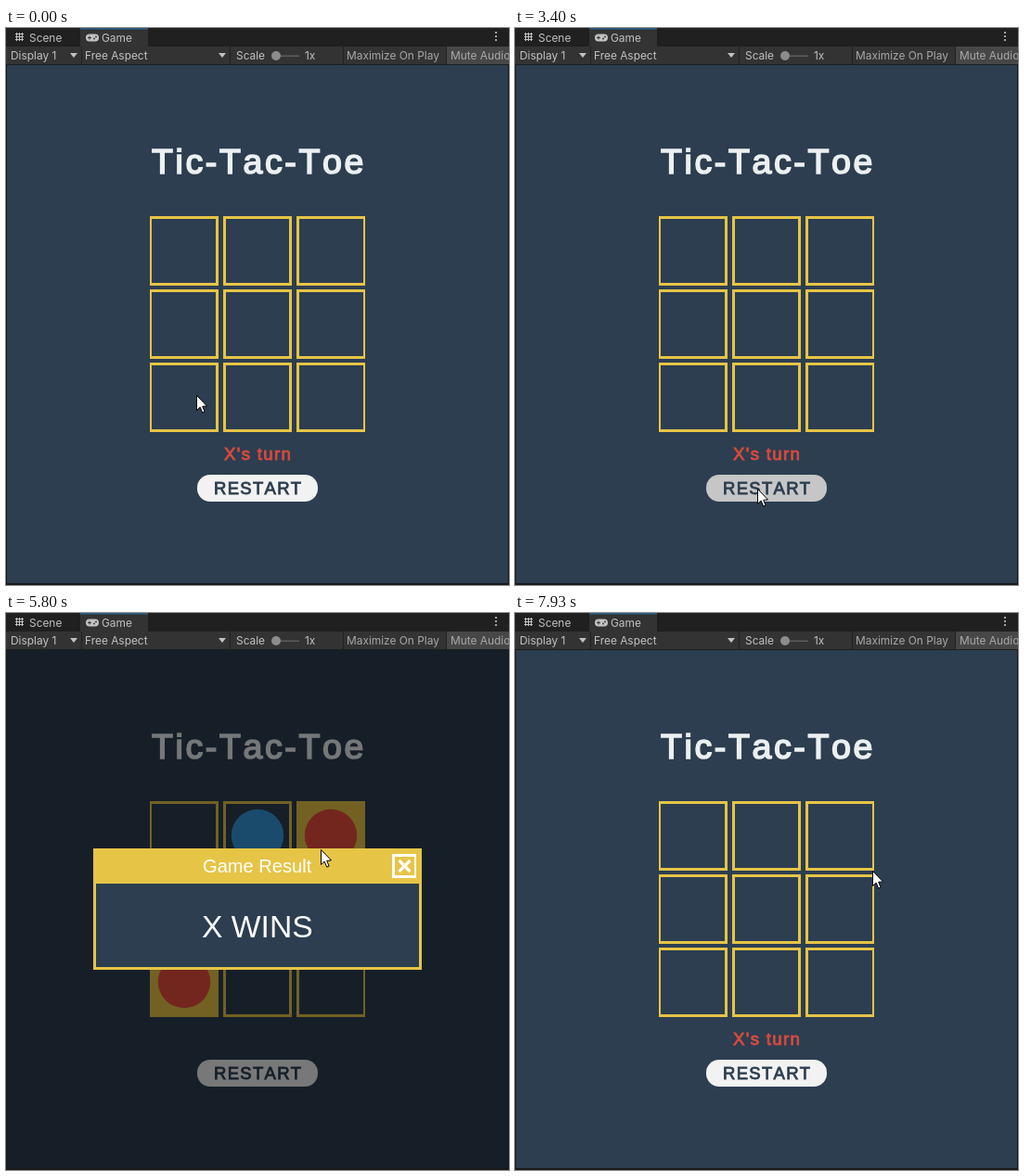
An HTML page with a canvas for the animation above (8000 ms loop, 542 px wide and 601 px high).

```html
<!DOCTYPE html>
<html lang="en">
<head>
<meta charset="utf-8">
<title>Tic-Tac-Toe</title>
<style>
html, body { margin: 0; width: 100%; height: 100%; overflow: hidden; background: #191919; }
canvas { display: block; }
</style>
</head>
<body>
<canvas id="stage" width="542" height="601"></canvas>
<script>
const ctx = document.getElementById('stage').getContext('2d');
const STEPS = 120, STEP = 200 / 3, FADE = 100;
const NAVY = '#2c3e50', YELLOW = '#e6c446', RED = '#e74c3c', BLUE = '#3498db';
const SANS = '"Liberation Sans", Arial, sans-serif';
const UI = 'Inter, Roboto, sans-serif';
const LINES = ['012', '345', '678', '036', '147', '258', '048', '246'];

// Pointer stops: what is clicked (a cell number, a named button or nothing),
// the tip's position, and the step of the release.
const stop = (button, x, y, step) => ({ button, x, y, up: Math.round(step * STEP) });
const STOPS = [
  stop('', 205, 396, 0),
  stop(6, 209, 396, 7),
  stop(3, 200, 325, 12),
  stop(0, 200, 236, 20),
  stop(1, 262, 250, 29),
  stop('restart', 263, 490, 45),
  stop('restart', 261, 497, 53),
  stop(6, 200, 400, 60),
  stop(3, 200, 325, 66),
  stop(4, 264, 324, 75),
  stop(1, 273, 252, 79),
  stop(2, 339, 255, 87),
  stop('', 339, 255, 91),
  stop('', 325, 287, 96),
  stop('close', 426, 270, 116),
  stop('', 385, 278, 119)
];
const CLICKS = STOPS.filter(s => s.button !== '');

const clamp = v => Math.max(0, Math.min(1, v));
const isCell = button => typeof button === 'number';

function rect(x, y, w, h, color) {
  ctx.fillStyle = color;
  ctx.fillRect(x, y, w, h);
}

function disc(x, y, r, color) {
  ctx.fillStyle = color;
  ctx.beginPath();
  ctx.arc(x, y, r, 0, Math.PI * 2);
  ctx.fill();
}

function pill(x, y, w, h, r, color) {
  ctx.fillStyle = color;
  ctx.beginPath();
  ctx.roundRect(x, y, w, h, r);
  ctx.fill();
}

function poly(points, color) {
  ctx.fillStyle = color;
  ctx.beginPath();
  points.forEach(p => ctx.lineTo(p[0], p[1]));
  ctx.closePath();
  ctx.fill();
}

function text(str, x, y, size, color, family = SANS) {
  ctx.font = `${size}px ${family}`;
  ctx.fillStyle = color;
  ctx.fillText(str, x, y);
}

// regular face, thickened and widely spaced
function heavy(str, x, y, size, color) {
  ctx.letterSpacing = size * 0.07 + 'px';
  ctx.fontKerning = 'none';
  text(str, x, y, size, color);
  ctx.strokeStyle = color;
  ctx.lineWidth = size * 0.045;
  ctx.lineJoin = 'miter';
  ctx.strokeText(str, x, y);
  ctx.letterSpacing = '0px';
  ctx.fontKerning = 'auto';
}

function gameAt(t) {
  let game = { board: {}, count: 0, win: '' };
  for (const { button, up } of CLICKS) {
    if (up > t) break;
    if (isCell(button)) {
      const mark = 'XO'[game.count++ % 2];
      game.board[button] = mark;
      game.win = LINES.find(l => [...l].every(c => game.board[c] === mark)) || '';
    } else {
      game = { board: {}, count: 0, win: '' };
    }
  }
  return game;
}

// how far a button is tinted, 0 to 1
function pressed(button, t) {
  const hold = isCell(button) ? 160 : 260;
  return Math.max(0, ...CLICKS.filter(c => c.button === button).map(({ up }) =>
    t < up ? clamp((t - up + hold) / FADE) : clamp(1 - (t - up) / FADE)));
}

// rest one step after a release, then glide to the next stop and wait there
function pointerAt(t) {
  const i = Math.max(1, STOPS.findIndex(s => s.up > t));
  const to = STOPS[t >= STOPS.at(-1).up ? STOPS.length - 1 : i];
  const from = STOPS[STOPS.indexOf(to) - 1];
  const begin = from.up + STEP;
  const end = from.up + (to.up - from.up) * (to.button === '' ? 1 : 0.45);
  const u = clamp((t - begin) / (end - begin)), e = u * u * (3 - 2 * u);
  return [Math.round(from.x + (to.x - from.x) * e), Math.round(from.y + (to.y - from.y) * e)];
}

function drawToolbar() {
  const ink = '#c2c2c2', dim = '#a8a8a8', dark = '#202020', panel = '#333333';
  const label = (str, x, y, color = ink) => text(str, x, y, 11.9, color, UI);
  rect(0, 0, 542, 20, dark);
  rect(80, 0, 73, 20, panel);
  rect(80, 0, 73, 1.5, '#2c5d87');
  rect(0, 20, 542, 20, panel);
  rect(475, 20, 67, 19, '#474747');
  rect(0, 39, 542, 1, '#1e1e1e');
  [81, 241, 363, 474].forEach(x => rect(x, 20, 1, 19, dark));

  // grid icon
  for (let i = 0; i < 3; i++) {
    rect(11 + 3 * i, 5, 1, 9, ink);
    rect(10, 6 + 3 * i, 9, 1, ink);
  }
  // gamepad icon
  pill(86, 6.5, 14, 8, 4, ink);
  rect(88, 10, 4, 1, panel);
  rect(89.5, 8.5, 1, 4, panel);
  disc(95, 11.5, 0.9, panel);
  disc(97, 9.5, 0.9, panel);

  label('Scene', 25, 15);
  label('Game', 103, 15);
  [5, 9, 13].forEach(y => disc(528, y, 1.1, ink));

  label('Display 1', 5, 34);
  label('Free Aspect', 85, 34);
  label('Scale', 248, 34);
  label('1x', 322, 34);
  label('Maximize On Play', 367, 34, dim);
  label('Mute Audio', 479, 34, dim);
  [73, 233].forEach(x => poly([[x - 4, 27], [x + 4, 27], [x, 32]], ink));
  rect(286, 29.5, 30, 1.5, '#5e5e5e');
  disc(291, 30, 5, '#8c8c8c');
}

function drawCell(id, game, t) {
  const col = id % 3, row = Math.floor(id / 3);
  const x = 155 + 79 * col, y = 203 + 79 * row;
  const left = col === 0 ? 2 : 3, right = col === 2 ? 2 : 3;
  rect(x, y, 74, 75, YELLOW);
  if (!game.win.includes(id)) {
    const inner = [x + left, y + 3, 74 - left - right, 69];
    rect(...inner, NAVY);
    rect(...inner, `rgba(230,196,70,${0.13 * pressed(id, t)})`);
  }
  const mark = game.board[id];
  if (mark) disc(x + 37, y + 37, 28.2, mark === 'X' ? RED : BLUE);
}

function drawPopup(t) {
  rect(1, 40, 540, 559, 'rgba(0,0,0,0.5)');
  rect(94, 254, 354, 131, YELLOW);
  rect(97, 292, 348, 90, NAVY);
  text('Game Result', 212, 280, 20.1, '#fff');
  text('X WINS', 211, 350, 33.7, '#fff');
  rect(416, 260, 26, 26, '#fff');
  rect(419, 263, 21, 20, YELLOW);
  rect(419, 263, 21, 20, `rgba(0,0,0,${0.216 * pressed('close', t)})`);
  ctx.strokeStyle = '#fff';
  ctx.lineWidth = 3.2;
  ctx.beginPath();
  for (const s of [-6, 6]) {
    ctx.moveTo(429.5 - s, 267);
    ctx.lineTo(429.5 + s, 279);
  }
  ctx.stroke();
}

function drawPointer([x, y]) {
  const shape = [[0, 0], [0, 16], [3.7, 12.6], [6.2, 18.6], [8.6, 17.6], [6.2, 11.8], [11, 11.4]]
    .map(p => [x + 0.5 + p[0], y + 0.5 + p[1]]);
  poly(shape, '#fff');
  ctx.strokeStyle = '#000';
  ctx.lineWidth = 1;
  ctx.lineJoin = 'round';
  ctx.stroke();
}

function draw(t) {
  const game = gameAt(t);
  rect(0, 0, 542, 601, '#191919');
  rect(1, 40, 540, 559, NAVY);
  heavy('Tic-Tac-Toe', 157, 156.5, 37.5, '#ecf0f1');
  for (let id = 0; id < 9; id++) drawCell(id, game, t);
  if (!game.win) {
    if (game.count % 2) heavy("O's turn", 233.4, 466, 18.7, '#318fd0');
    else heavy("X's turn", 235, 466, 18.7, '#d94a3d');
  }
  const v = Math.round(242 - 44 * pressed('restart', t));
  pill(206, 482, 130, 29, 14, `rgb(${v},${v},${v})`);
  heavy('RESTART', 224, 503, 18.5, NAVY);
  if (game.win) drawPopup(t);
  drawToolbar();
  drawPointer(pointerAt(t));
}

const start = performance.now();
function tick() {
  // the game view updates 15 times a second
  const step = Math.floor((performance.now() - start + 4) / STEP) % STEPS;
  draw(Math.round(step * STEP));
  requestAnimationFrame(tick);
}
tick();
</script>
</body>
</html>
```
